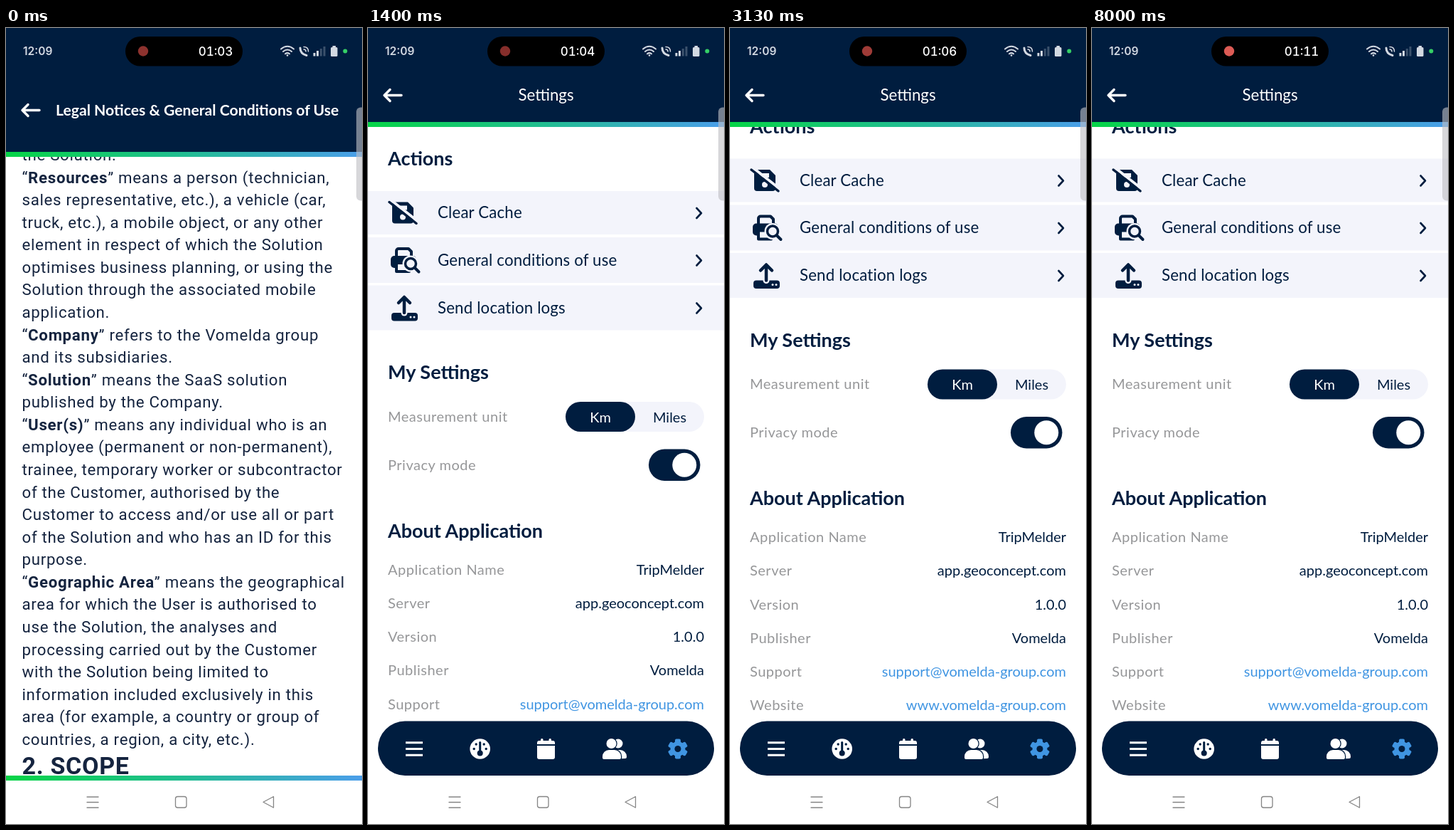
Write an HTML page that moves like this. It is 501 px wide and 1118 px high and loops after 8070 ms.

```html
<!DOCTYPE html>
<html lang="en">
<head>
<meta charset="utf-8">
<title>Settings screen</title>
<style>
  html, body { margin: 0; width: 100%; height: 100%; overflow: hidden; background: #fff; }
  svg { display: block; width: 100vw; height: 100vh; }
  text { font-family: Lato, "Open Sans", sans-serif; fill: #001d3f; }
  .legal { font: 22.27px Roboto, sans-serif; letter-spacing: .7px; fill: #15243f; }
  .chapter { font: 700 34px Roboto, sans-serif; letter-spacing: .7px; fill: #15243f; }
  .bold { font-weight: 700; }
  .title { font-size: 22.3px; fill: #fff; }
  .legal-title { font-size: 21.2px; font-weight: 700; fill: #fff; }
  .heading { font-size: 27px; font-weight: 700; }
  .row { font-size: 22.3px; letter-spacing: .15px; }
  .label { font-size: 20px; letter-spacing: .5px; fill: #969799; }
  .value { font-size: 20px; }
  .link { fill: #4095e2; }
  .light { fill: #fff; }
  .clock { font: 600 15.5px Inter, sans-serif; fill: #d3d9e2; }
  .timer { font: 500 17px Inter, sans-serif; font-variant-numeric: tabular-nums; fill: #fff; }
  .line { fill: none; stroke-linecap: round; stroke-linejoin: round; }
</style>
</head>
<body>
<svg viewBox="0 0 501 1118" preserveAspectRatio="none">
  <defs>
    <linearGradient id="rainbow">
      <stop offset="0" stop-color="#06d447"/>
      <stop offset=".5" stop-color="#22bd92"/>
      <stop offset="1" stop-color="#4b9eea"/>
    </linearGradient>
    <g id="back" class="line" stroke="#fff" stroke-width="3.4">
      <path d="M47 0H23M31-8L23 0L31 8"/>
    </g>
    <g id="disk" fill="#001d3f">
      <path d="M-11-15H7L15-7V11a4 4 0 0 1-4 4H-11a4 4 0 0 1-4-4V-11a4 4 0 0 1 4-4Z"/>
      <path fill="#f3f4fb" d="M-8-10H6V-4H-8Z"/>
      <circle cy="6" r="4" fill="#f3f4fb"/>
      <path class="line" stroke="#f3f4fb" stroke-width="4" d="M-17-18L21 12"/>
      <path class="line" stroke="#001d3f" stroke-width="3.500" d="M-19-15L19 15"/>
    </g>
    <g id="printer">
      <rect x="-20" y="-6" width="36" height="17" rx="5" fill="#001d3f"/>
      <path class="line" stroke="#001d3f" stroke-width="4" d="M-12-4V-13a3 3 0 0 1 3-3H5L9-12V-6"/>
      <path fill="#f3f4fb" stroke="#001d3f" stroke-width="4" stroke-linejoin="round" d="M-12 4H6V16H-12Z"/>
      <path class="line" stroke="#f3f4fb" stroke-width="8" d="M13 10L19 16"/>
      <circle cx="8" cy="5" r="11.500" fill="#f3f4fb"/>
      <circle cx="8" cy="5" r="7.500" fill="#f3f4fb" stroke="#001d3f" stroke-width="3.500"/>
      <path class="line" stroke="#001d3f" stroke-width="4" d="M14 11L19.500 16.500"/>
    </g>
    <g id="upload">
      <rect x="-18" y="7" width="37" height="11.500" rx="4" fill="#001d3f"/>
      <path class="line" stroke="#f3f4fb" stroke-width="9" d="M0 0V7"/>
      <path class="line" stroke="#001d3f" stroke-width="4.500" d="M0 7V-14M-8-7L0-15L8-7"/>
      <g fill="#f3f4fb"><circle cx="9" cy="13" r="1.500"/><circle cx="14" cy="13" r="1.500"/></g>
    </g>
  </defs>

  <g id="settings">
    <rect x="-20" y="-20" width="541" height="1160" fill="#fff"/>
    <g id="content"></g>
    <rect x="-20" y="-20" width="541" height="153" fill="#001d3f"/>
    <rect y="132" width="501" height="7" fill="url(#rainbow)"/>
    <use href="#back" y="94.500"/>
    <text class="title" x="250.500" y="101.500" text-anchor="middle">Settings</text>
    <rect x="14" y="973.500" width="473" height="76.500" rx="38" fill="#001d3f"/>
    <path fill="none" stroke="#fff" stroke-width="3" d="M53 1003.800H77M53 1012.500H77M53 1021.200H77"/>
    <g transform="translate(157.700 1012.500)">
      <circle r="14.300" fill="#fff"/>
      <path class="line" stroke="#001d3f" stroke-width="3" d="M0-9V4"/>
      <g fill="#001d3f">
        <circle cy="6" r="4"/><circle cx="-8.500" r="1.700"/><circle cx="8.500" r="1.700"/>
        <circle cx="-5.500" cy="-6.500" r="1.700"/><circle cx="5.500" cy="-6.500" r="1.700"/>
      </g>
    </g>
    <g fill="#fff">
      <path d="M241 1001H260a3 3 0 0 1 3 3V1006H238V1004a3 3 0 0 1 3-3Z"/>
      <path d="M238 1008H263V1024a3 3 0 0 1-3 3H241a3 3 0 0 1-3-3Z"/>
      <rect x="243" y="998" width="3.500" height="6" rx="1.500"/>
      <rect x="254.500" y="998" width="3.500" height="6" rx="1.500"/>
      <circle cx="352" cy="1005" r="6.500"/>
      <path d="M340 1027V1022a8 8 0 0 1 8-8H355a9 9 0 0 1 9 9V1024a2 2 0 0 1-2 2Z"/>
      <g stroke="#001d3f" stroke-width="2.500" paint-order="stroke">
        <circle cx="342.500" cy="1005" r="7"/>
        <path d="M330 1025V1023a9 9 0 0 1 9-9H347a9 9 0 0 1 9 9V1025a2 2 0 0 1-2 2H332a2 2 0 0 1-2-2Z"/>
      </g>
    </g>
    <g id="gear" transform="translate(436 1012.500)" fill="#4095e2"></g>
  </g>

  <g id="legal">
    <rect width="501" height="1118" fill="#fff"/>
    <g id="article"></g>
    <rect width="501" height="175" fill="#001d3f"/>
    <rect y="174" width="501" height="7" fill="url(#rainbow)"/>
    <rect y="1050" width="501" height="7" fill="url(#rainbow)"/>
    <use href="#back" y="115.500"/>
    <text class="legal-title" x="70" y="122.500">Legal Notices &amp; General Conditions of Use</text>
  </g>

  <rect y="1057" width="501" height="61" fill="#fff"/>
  <g class="line" stroke="#858585" stroke-width="1.300">
    <path d="M114 1080H130M114 1087.500H130M114 1095H130M376.500 1079.500V1095L362 1087.300Z"/>
    <rect x="238.500" y="1079.500" width="15.500" height="15.500" rx="3"/>
  </g>

  <text class="clock" x="24" y="38">12:09</text>
  <rect x="168" y="12" width="165" height="41.500" rx="20.700" fill="#000"/>
  <circle id="record" cx="193" cy="32.500" r="7.200"/>
  <text id="timer" class="timer" x="295" y="38.500" text-anchor="middle"></text>
  <g class="line" stroke="#d3d9e2" stroke-width="2">
    <path d="M387 29.500Q396 22 405 29.500M390 33Q396 28 402 33M393 36.300Q396 34 399 36.300"/>
    <path stroke-width="3" d="M414 28Q414 36 423 38.500"/>
    <path stroke-width="1.500" d="M419 30Q422 30 422 33M419 26.500Q425.500 26.500 425.500 33"/>
  </g>
  <g fill="#d3d9e2">
    <circle cx="396" cy="38.500" r="1.300"/>
    <rect x="432.500" y="35" width="3" height="4.500"/>
    <rect x="437" y="32" width="3" height="7.500"/>
    <g fill="#3b516c">
      <rect x="441.800" y="29" width="3" height="10.500"/><rect x="446.500" y="26" width="3" height="13.500"/>
    </g>
    <rect x="457" y="27" width="9.500" height="13" rx="1.500"/>
    <rect x="459.500" y="25" width="4.500" height="3"/>
  </g>
  <circle cx="477.300" cy="32.500" r="3" fill="#35cf66"/>
  <rect x="493" y="111.500" width="16" height="131" rx="6" fill="#bebfc3" fill-opacity=".62"/>
  <circle id="touch" r="12" fill="#bec0cd" fill-opacity=".45" stroke="#9aa0bd" stroke-opacity=".6" stroke-width="1.600"/>
</svg>

<script>
const LOOP = 8070;
const byId = id => document.getElementById(id);
const clamp = v => Math.min(1, Math.max(0, v));
const mix = (a, b, k) => a + (b - a) * k;
const text = (cls, x, y, str, anchor = "start") =>
  `<text class="${cls}" x="${x}" y="${y}" text-anchor="${anchor}">${str}</text>`;
const rect = (x, y, w, h, r, fill) =>
  `<rect x="${x}" y="${y}" width="${w}" height="${h}" rx="${r}" fill="${fill}"/>`;

// Asterisks mark the bold terms.
const article = `the Solution.
“*Resources*” means a person (technician,
sales representative, etc.), a vehicle (car,
truck, etc.), a mobile object, or any other
element in respect of which the Solution
optimises business planning, or using the
Solution through the associated mobile
application.
“*Company*” refers to the Vomelda group
and its subsidiaries.
“*Solution*” means the SaaS solution
published by the Company.
“*User(s)*” means any individual who is an
employee (permanent or non-permanent),
trainee, temporary worker or subcontractor
of the Customer, authorised by the
Customer to access and/or use all or part
of the Solution and who has an ID for this
purpose.
“*Geographic Area*” means the geographical
area for which the User is authorised to
use the Solution, the analyses and
processing carried out by the Customer
with the Solution being limited to
information included exclusively in this
area (for example, a country or group of
countries, a region, a city, etc.).`.split("\n");

byId("article").innerHTML = article.map((line, i) =>
  text("legal", 22.5, 186 + i * 31.57,
    line.replace(/\*(.+?)\*/, '<tspan class="bold">$1</tspan>'))
).join("") + text("chapter", 22.5, 1047.5, "2. SCOPE");

const actions = [
  ["Clear Cache", "disk", 49, 259.5, 61],
  ["General conditions of use", "printer", 52, 326, 64],
  ["Send location logs", "upload", 51, 393, 63]
];
const details = [
  ["Application Name", "TripMelder"],
  ["Server", "app.geoconcept.com"],
  ["Version", "1.0.0"],
  ["Publisher", "Vomelda"],
  ["Support", "support@vomelda-group.com", "link"],
  ["Website", "www.vomelda-group.com", "link"]
];

byId("content").innerHTML =
  text("heading", 28, 193, "Actions") +
  actions.map(([name, icon, x, y, h]) =>
    rect(-20, y - h / 2, 541, h, 0, "#f3f4fb") +
    `<use href="#${icon}" x="${x}" y="${y}"/>` +
    text("row", 98, y + 7.5, name) +
    `<path class="line" stroke="#001d3f" stroke-width="2.6" d="M462.500 ${y - 6.500}l6.500 7l-6.500 7"/>`
  ).join("") +
  text("heading", 28, 493, "My Settings") +
  text("label", 28, 552.5, "Measurement unit") +
  rect(278, 525, 195, 42, 21, "#f3f4fb") +
  rect(278, 525, 98, 42, 21, "#001d3f") +
  text("value light", 327, 553.5, "Km", "middle") +
  text("value", 424.5, 553.5, "Miles", "middle") +
  text("label", 28, 620.5, "Privacy mode") +
  rect(395, 591.5, 72.5, 44.5, 22.2, "#001d3f") +
  `<circle cx="445.300" cy="613.800" r="17" fill="#fff"/>` +
  text("heading", 28, 715.5, "About Application") +
  details.map(([name, value, cls = ""], i) => {
    const y = 767.5 + i * 47.25;
    return text("label", 28, y, name) + text("value " + cls, 473, y, value, "end");
  }).join("");

byId("gear").innerHTML = [0, 60, 120].map(a =>
  `<rect x="-4" y="-14" width="8" height="28" rx="2" transform="rotate(${a})"/>`
).join("") + '<circle r="10.500"/><circle r="4.500" fill="#001d3f"/>';

const zoom = s => `translate(250.5 559) scale(${s}) translate(-250.5 -559)`;

// The finger taps the back arrow, later drags the settings list upwards.
function finger(t) {
  if (t >= 950 && t < 1235) return [44, 115];
  if (t < 2200 || t >= 2880) return null;
  const first = clamp((t - 2330) / 270);
  const rest = 1 - (1 - clamp((t - 2600) / 240)) ** 2;
  return [298 + 16 * first + 6 * rest, 827 - 44 * first - 26 * rest];
}

function render(t) {
  const seconds = 3 + Math.floor((t + 500) / 1000);
  byId("timer").textContent = "01:" + String(seconds).padStart(2, "0");

  const glow = 0.5 + 0.5 * Math.cos((t - 620) / 1500 * 2 * Math.PI);
  byId("record").setAttribute("fill",
    `rgb(${mix(134, 226, glow)},${mix(46, 94, glow)},${mix(43, 88, glow)})`);

  const pop = clamp((t - 1103) / 300);
  const eased = 1 - (1 - pop) ** 3;
  byId("settings").setAttribute("transform", zoom(1.1 - 0.1 * eased));
  const legal = byId("legal");
  legal.setAttribute("transform", zoom(1 - 0.1 * eased));
  legal.setAttribute("opacity", 1 - clamp((pop - 0.0825) / 0.125));

  const touch = byId("touch"), point = finger(t);
  touch.setAttribute("visibility", point ? "visible" : "hidden");
  if (point) touch.setAttribute("transform", `translate(${point})`);

  const scroll = Math.min(45.5, 43 / 270 * Math.max(0, t - 2330));
  byId("content").setAttribute("transform", `translate(0 ${-scroll})`);
}

const start = performance.now();
function tick() {
  render((performance.now() - start) % LOOP);
  requestAnimationFrame(tick);
}
tick();
</script>
</body>
</html>
```
